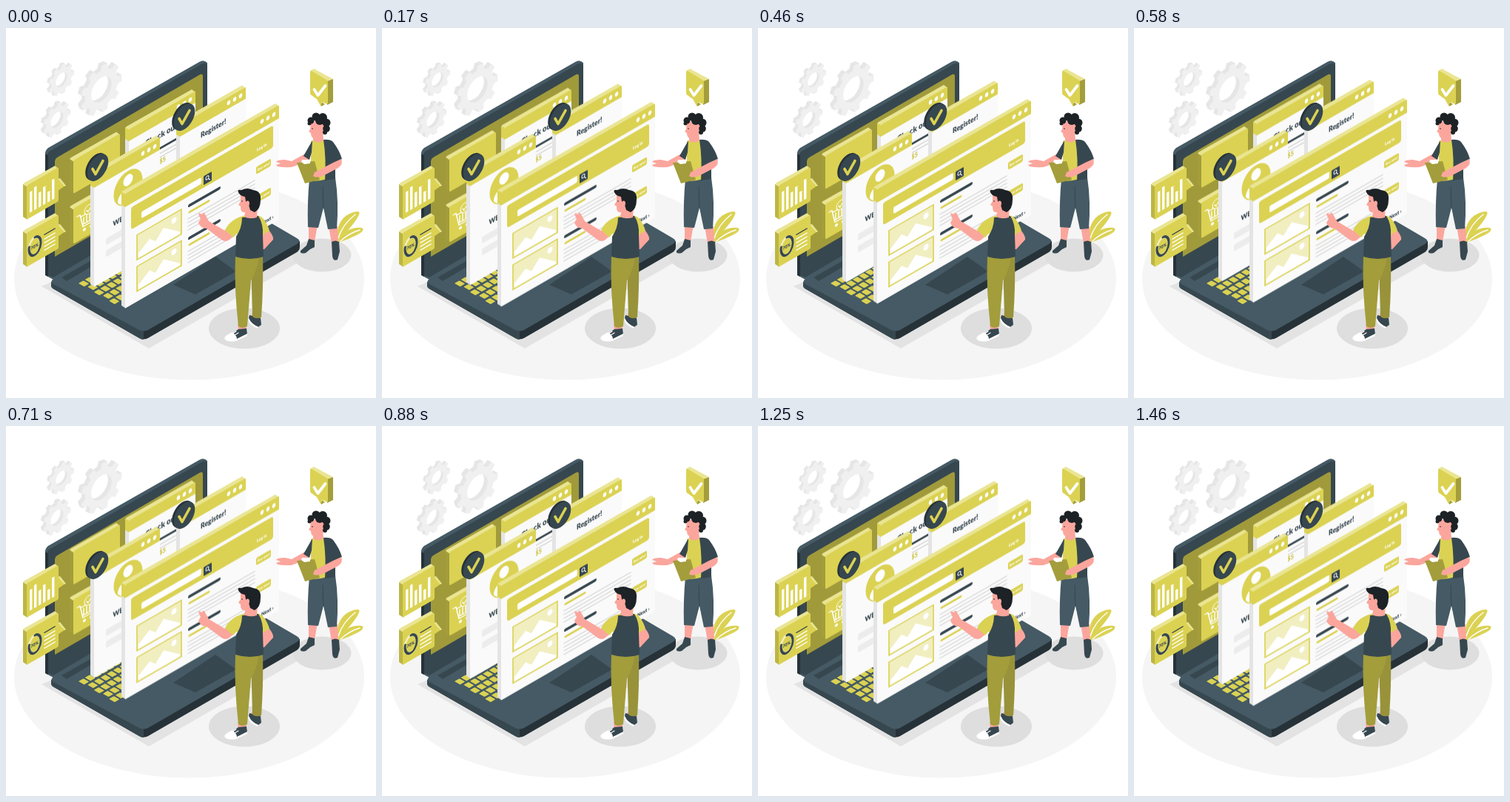
An HTML page for the animation above (1500 ms loop, 500x500 px).

```html
<!DOCTYPE html>
<html lang="en">
<head>
<meta charset="utf-8">
<title>Website setup</title>
<style>
  html, body { margin: 0; width: 100%; height: 100%; overflow: hidden; background: #fff; }
  svg { display: block; width: 100vw; height: 100vh; }
  text { font-family: Lato, "Open Sans", sans-serif; font-weight: 900; fill: #37474f; }
  .y { fill: #dbd253; } .lt { fill: #eae592; } .ol { fill: #a39d3b; } .mid { fill: #bdb545; }
  .d { fill: #37474f; } .m { fill: #455a64; } .k { fill: #263238; }
  .w { fill: #fff; } .p { fill: #fba69d; } .hair { fill: #1d2226; }
  .edge { fill: #e4e4e4; } .sheet { fill: #fafafa; } .pale { fill: #ececec; }
  .line { fill: none; stroke-linecap: round; stroke-linejoin: round; }
</style>
</head>
<body>
<svg viewBox="0 0 500 500" xmlns="http://www.w3.org/2000/svg">
  <ellipse cx="247.500" cy="339" rx="236.500" ry="136.500" fill="#f5f5f5"/>
  <path d="M48 349L193 433 400 314 300 240z" fill="#e3e3e3"/>
  <ellipse cx="322" cy="406" rx="48" ry="27.500" fill="#dedede"/>
  <ellipse cx="427" cy="307" rx="39.500" ry="22.500" fill="#dedede"/>
  <g id="gears"></g>

  <g id="laptop">
    <path class="k" d="M61 343V348Q61 351 65 353L180 419Q186 422 192 419L393 303Q397 300 397 296V288z"/>
    <path class="d" d="M61 343V348Q61 351 65 353L180 419Q183 421 186 421V409z"/>
    <path class="m" d="M64 339L270 212 393 284Q400 288 393 292L192 408Q186 411 180 408L64 346Q59 343 64 339z"/>
    <path class="d" d="M75 337L114 315 121 319 82 342z"/>
    <path class="d" d="M226 347L283 309 311 329 256 360z"/>
    <path class="m" d="M53 170Q53 165 57 162L261 46Q267 42 272 47V216L64 340 53 334z"/>
    <path class="d" d="M56 172Q56 168 60 166L264 49Q272 45 272 52V214L64 337 56 334z"/>
    <path class="k" d="M53 170L57 172V336L53 334z"/>
    <path d="M66 180Q66 177 69 175L262 63Q266 61 266 65V193L66 309z" fill="#a09a3b"/>
    <g id="keys" transform="matrix(1 .577 1 -.577 98 345)"></g>
  </g>

  <g id="float"></g>
  <g id="badges"></g>
  <g id="charts"></g>

  <g id="note">
    <path class="lt" d="M411 58L416 55 442 69 435 73z"/>
    <path class="ol" d="M434 72L442 69V100L434 104z"/>
    <path class="ol" d="M423 98L428 101 431 103 426 106z"/>
    <path class="y" d="M411 60Q411 57 413 58L433 70Q435 71 435 74V101Q435 104 432 102L428 100 425 105 420 96 413 91Q411 90 411 87z"/>
    <path class="line" d="M416.500 83L421.500 91 431.500 78" stroke="#fff" stroke-width="3.800"/>
  </g>

  <g id="plant">
    <path class="y" d="M447 284Q447 256 469 249Q480 246 477 252Q473 263 449 287z"/>
    <path class="y" d="M449 288Q459 268 481 270Q485 272 479 277Q467 284 449 290z"/>
    <path class="line" d="M449 284Q455 265 472 252M452 288Q464 277 478 273" stroke="#fff" stroke-width="1.400"/>
  </g>

  <g id="woman">
    <path class="p" d="M409 266H421L417 289H409zM436 268H448L449 291H440z"/>
    <path class="d" d="M409 285L417 287 417 296 411 299 405 304Q397 306 398 301L406 294zM440 289Q445 286 450 289L451 302 448 313Q442 316 441 308z"/>
    <path class="m" d="M410 204L445 202Q450 235 447 271L435 272 429 243 422 270 408 269Q407 235 410 204z"/>
    <path class="line" d="M429 243L428 215" stroke="#37474f"/>
    <path class="p" d="M404 170L386 180 377 178Q366 178 365 181L371 183 365 185Q366 189 386 188L411 179z"/>
    <path class="y" d="M412 153Q422 149 430 151L434 204Q421 208 410 206L412 178z"/>
    <path class="d" d="M414 152L402 173 410 178 413 168z"/>
    <path class="d" d="M429 151Q438 150 442 154Q451 166 454 177L445 182 445 204 431 206Q433 178 429 151z"/>
    <path class="p" d="M415 144L428 138 429 152Q421 157 415 152z"/>
    <path class="p" d="M412 126L411 137 409 140 412 142Q412 149 417 149Q426 148 429 141L430 127z"/>
    <g class="hair">
      <circle cx="412" cy="125" r="4.500"/><circle cx="419" cy="120" r="5.500"/><circle cx="428" cy="121" r="6"/>
      <circle cx="433" cy="128" r="5.500"/><circle cx="433" cy="136" r="4.800"/><circle cx="424" cy="125" r="6"/>
      <circle cx="410" cy="129" r="2.500"/><circle cx="431" cy="141" r="3"/>
    </g>
    <circle class="hair" cx="414" cy="136" r=".8"/>
    <path class="ol" d="M393 182L417 180 424 205 404 210z"/>
    <path class="w" d="M399 181L400 178 411 178 411 183 403 184z"/>
    <path class="p" d="M442 182L453 177Q456 184 449 189L428 200Q418 203 415 200L417 195z"/>
  </g>

  <g id="man">
    <path class="p" d="M313 400H325V410H314zM332 386H344V394H332z"/>
    <path class="d" d="M329 388L344 392 345 401 341 404Q331 400 328 392z"/>
    <path class="w" d="M328 392Q331 400 341 404L340 406Q329 402 327 394z"/>
    <path class="d" d="M314 407L325 406 326 414 311 421 302 416z"/>
    <path class="w" d="M306 411Q312 416 312 420L326 413V416L311 423Q297 425 295 419Q298 414 306 411z"/>
    <path class="line" d="M306 413L311 410M309 415L314 412" stroke="#fff" stroke-width="1.200"/>
    <path d="M331 310L347 306Q348 350 345 391Q338 394 333 390z" fill="#98923a"/>
    <path class="ol" d="M310 307L342 309Q338 332 331 341L326 403Q319 407 314 403Q308 350 310 307z"/>
    <path class="p" d="M345 275L356 274Q362 282 361 286L349 299H345z"/>
    <path class="p" d="M303 270L296 274 274 261 268 250Q265 249 265 252L261 250Q259 251 263 258L260 263Q262 270 271 271L291 286Q297 290 302 286L310 279z"/>
    <path class="y" d="M324 253Q342 251 348 258Q354 266 356 274L346 280 311 278 307 283 296 273Q304 257 324 253z"/>
    <path class="d" d="M319 256L341 254Q348 265 347 280L348 309Q330 315 310 309L311 282Q319 270 319 256z"/>
    <path class="p" d="M324 244L340 240 339 256Q329 259 322 255z"/>
    <path class="p" d="M317 225L317 234 314 239 317 241Q317 249 321 249Q330 249 333 243V226z"/>
    <path class="hair" d="M314 222Q312 218 318 219Q326 215 334 219Q345 220 344 232Q344 245 336 249L330 246 328 239 324 234 323 228Q316 227 314 222z"/>
    <ellipse class="p" cx="326.500" cy="237" rx="2.500" ry="3.500"/>
    <circle class="hair" cx="319" cy="234" r=".8"/>
  </g>
</svg>
<script>
const $ = id => document.getElementById(id);
const SLOPE = Math.tan(Math.PI / 6);
const DX = 5, DY = 3;

const rect = (x, y, w, h, cls, r = 0, extra = '') =>
  `<rect x="${x}" y="${y}" width="${w}" height="${h}" rx="${r}" class="${cls}" ${extra}/>`;
const poly = (pts, cls) => `<polygon points="${pts.join(' ')}" class="${cls}"/>`;
const stroke = (d, color, width) => `<path class="line" d="${d}" stroke="${color}" stroke-width="${width}"/>`;
const plane = (x, y, body) => `<g transform="translate(${x} ${y}) skewY(-30)">${body}</g>`;
const label = (x, y, size, str, fill = '#37474f') =>
  `<text transform="translate(${x} ${y}) scale(.866 1)" font-size="${size}" style="fill:${fill}">${str}</text>`;
const lines = (x, y, w, n, gap, color) =>
  Array.from({ length: n }, (_, i) => stroke(`M${x} ${y + i * gap}h${w}`, color, 1.5)).join('');

// Upright slab: left edge, top edge and front face
function slab(x, y, w, h, side, top, front, body) {
  const rise = w * SLOPE;
  return poly([x + 1, y + 1, x - DX, y - DY + 1, x - DX, y - DY + h - 1, x + 1, y + h], side) +
    poly([x + 1, y + 2, x - DX, y - DY + 1, x - DX + 2, y - DY - 1, x + w - DX, y - DY - rise + 1,
      x + w - 1, y - rise + 1], top) +
    plane(x, y, rect(0, 0, w, h, front, 2) + body);
}

function page(x, y, w, h, head, body) {
  const dots = [23, 15, 7].map(d => `<ellipse cx="${w - d}" cy="${head / 2}" rx="2.300" ry="3" class="w"/>`).join('');
  const bar = `<path class="y" d="M0 ${head}V2Q0 0 2 0H${w - 2}Q${w} 0 ${w} 2V${head}z"/>`;
  return slab(x, y, w, h, 'edge', 'lt', 'sheet', bar + dots + body) +
    poly([x, y, x - DX, y - DY + 1, x - DX, y - DY + head, x, y + head], 'y');
}

function picture(x, y) {
  return rect(x, y, 60, 33.5, '', 0, 'fill="#f1eec0" stroke="#dbd253" stroke-width="1.600"') +
    `<path class="w" d="M${x + 2} ${y + 32}v-6l15 -11 8 8 11 -12 22 18v3z"/>` +
    `<ellipse class="w" cx="${x + 50}" cy="${y + 9}" rx="3.500" ry="4"/>`;
}

const buy = y => rect(177, y, 20, 10, 'y', 2) + label(179, y + 6.8, 4.6, 'Buy now!', '#fff');

const article = y =>
  stroke(`M87 ${y}h40`, '#37474f', 4) + stroke(`M87 ${y + 9}h26`, '#dbd253', 3) +
  lines(85, y + 17, 90, 4, 5, '#dadada');

const cart = '<g transform="translate(-3 -5)">' +
  stroke('M8 19h4l4 18h14M12.500 22h18l-3 12h-12M17 25v8M21 24v9M25 24v9', '#fff', 1.4) +
  '<circle cx="18" cy="42" r="2" class="w"/><circle cx="27" cy="42" r="2" class="w"/>' +
  '<circle cx="24" cy="18" r="6" class="y" stroke="#fff"/>' + stroke('M21 18l2 3 4-5', '#fff', 1.3) + '</g>';

const checkout = label(22, 36, 11, 'Check out') + stroke('M38 50h28', '#37474f', 3) +
  lines(38, 57, 28, 2, 5, '#d5d5d5') + label(41, 71, 9, '$5', '#cfc650');

const welcome =
  '<ellipse cx="46" cy="43" rx="19.500" ry="22.500" class="y"/><ellipse cx="46" cy="33" rx="6.500" ry="7.500" class="w"/>' +
  '<path class="w" d="M32 56Q32 44 46 44T60 56Q55 64 46 64T32 56z"/>' +
  label(25.5, 84, 9.5, 'WELCOME') + rect(16, 95, 60, 9, 'pale', 2) + rect(16, 111, 60, 9, 'pale', 2);

const shop = rect(8, 23, 192, 30, 'y', 3) + rect(22, 37, 81, 9, 'w', 2) + rect(106, 37.5, 11, 12, 'd', 1) +
  '<ellipse cx="111" cy="42.500" rx="2" ry="2.300" fill="none" stroke="#fff"/>' + stroke('M112.500 44.500l2 2.500', '#fff', 1) +
  label(178, 45.5, 5.8, 'Log in', '#fff') + picture(16, 65) + picture(16, 107.5) +
  article(66) + article(110) + buy(66) + buy(105) + label(184, 149, 7, 'Next ›');

$('float').innerHTML =
  slab(91, 179, 63, 45, 'ol', 'lt', 'y', '') +
  slab(91, 244, 63, 48, 'ol', 'lt', 'y', cart) +
  page(166, 137, 90, 120, 16, checkout) +
  page(235, 131, 89, 120, 16, label(28, 34, 10, 'Register!')) +
  page(119, 199, 89, 151, 17, welcome) +
  page(161, 224, 208, 155, 18, shop);

const keys = [];
for (let row = 0; row < 5; row++)
  for (let col = 0; col < 8; col++)
    keys.push(rect(row * 10.3, col * 8.6 + (row % 2) * 2, 7.6, 6.6, 'y', .8));
$('keys').innerHTML = keys.join('');

const badge = (x, y) => {
  const disc = (dx, dy, cls) =>
    `<circle r="16.500" class="${cls}" transform="matrix(.866 -.5 0 1 ${x + dx} ${y + dy})"/>`;
  return disc(-2.5, -1.2, 'k') + disc(0, 0, 'd') + stroke(`M${x - 7} ${y + 2}l4 7 10-18`, '#dbd253', 3.6);
};
$('badges').innerHTML = badge(124, 188.5) + badge(241, 120.5);

function bubble(y, tipY, body) {
  return slab(28, y, 43, 46, 'mid', 'lt', 'y', body) +
    poly([70, tipY - 9, 80, tipY, 70, tipY + 7], 'y') + poly([70, tipY - 9, 73, tipY - 10, 81, tipY, 79, tipY + 1], 'lt');
}
const bars = [28, 31, 20, 24, 14, 27]
  .map((h, i) => rect(4 + i * 6, 39 - h, 3.4, h, 'w')).join('');
const gauge = '<ellipse cx="11" cy="24" rx="8" ry="12" fill="none" stroke="#f1eec0" stroke-width="3.200"/>' +
  stroke('M11 12A8 12 0 1 1 3.300 21', '#37474f', 3) + label(5.5, 26.5, 6, '70%') +
  stroke('M24 16h14', '#37474f', 1.5) + lines(24, 22, 14, 4, 5, '#fff');
$('charts').innerHTML = bubble(213, 213, bars) + bubble(277, 275, gauge);

function gear(x, y, r, hole, depth) {
  const teeth = 9, pts = [];
  for (let i = 0; i < teeth; i++)
    for (const [a, k] of [[-.3, .8], [-.19, 1], [.19, 1], [.3, .8]]) {
      const t = (i + a) / teeth * Math.PI * 2;
      pts.push(`${(Math.cos(t) * r * k).toFixed(2)} ${(Math.sin(t) * r * k).toFixed(2)}`);
    }
  const d = `M${pts.join('L')}zM${hole} 0A${hole} ${hole} 0 1 0 ${-hole} 0A${hole} ${hole} 0 1 0 ${hole} 0z`;
  let out = '';
  for (let i = depth; i >= 0; i--)
    out += `<path d="${d}" fill-rule="evenodd" fill="${i ? '#e6e6e6' : '#f0f0f0'}"
      transform="matrix(.866 -.5 0 1 ${x - i} ${y - i * .58})"/>`;
  return out;
}
$('gears').innerHTML = gear(75, 70, 20, 9, 3) + gear(69, 124, 21.5, 10, 4) + gear(129, 83, 32, 16, 5);

$('float').animate(
  [0, -10, 0].map(y => ({ transform: `translateY(${y}px)` })),
  { duration: 1500, iterations: Infinity, easing: 'linear' }
);
</script>
</body>
</html>
```
